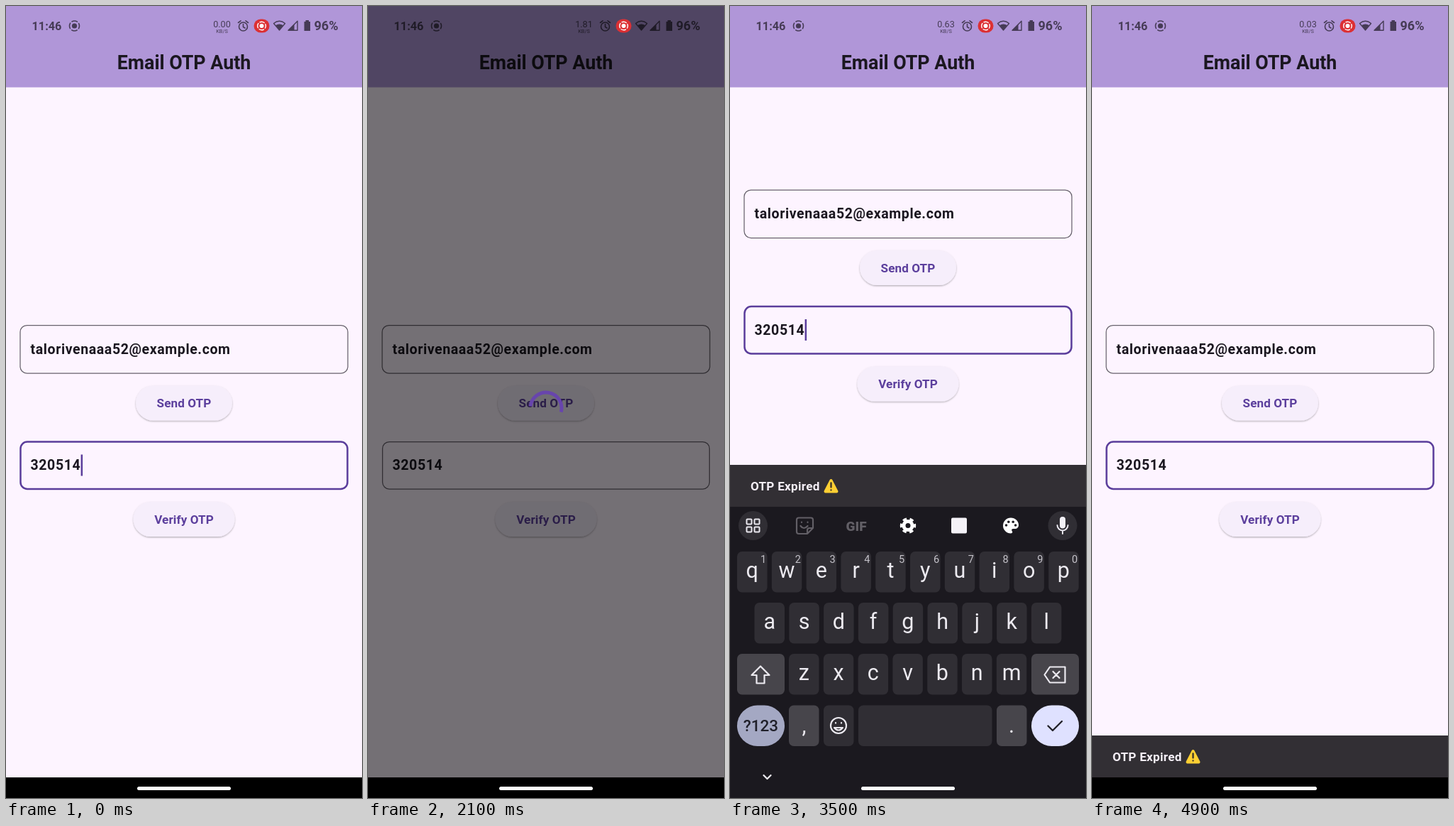
An HTML page that plays this animation: 502 by 1115 pixels, repeating every 5000 ms.

```html
<!DOCTYPE html>
<html lang="en">
<head>
<meta charset="utf-8">
<title>Email OTP Auth</title>
<style>
  html, body { margin: 0; width: 100%; height: 100%; overflow: hidden; background: #000; }
  svg { display: block; width: 502px; height: 1115px; font-family: Roboto, sans-serif; }
  .line { fill: none; stroke: currentColor; stroke-linecap: round; stroke-linejoin: round; }
  .mid { text-anchor: middle; }
  .input { font: 700 19.5px Roboto, sans-serif; letter-spacing: .61px; fill: #1b1720; }
  .button { font: 700 17.1px Roboto, sans-serif; letter-spacing: .12px; fill: #5c3f9d; text-anchor: middle; }
  .field { fill: none; stroke: #68636d; stroke-width: 1.25; }
  .field.focus { stroke: #5a3d9b; stroke-width: 2.5; }
  .letter { font-size: 30.5px; fill: #eceaf0; text-anchor: middle; }
  .hint { font-size: 14.5px; fill: #c5c3ca; text-anchor: middle; }
</style>
</head>
<body>
<svg viewBox="0 0 502 1115">
  <defs>
    <filter id="shadow" x="-10%" y="-20%" width="120%" height="150%">
      <feDropShadow dx="0" dy="1.2" stdDeviation="1" flood-opacity=".3"/>
    </filter>
  </defs>

  <rect width="502" height="1115" fill="#fdf4ff"/>
  <rect width="502" height="114.5" fill="#b096d8"/>
  <text class="mid" x="251" y="89" font-size="26.8" font-weight="700" fill="#1b1720">Email OTP Auth</text>

  <g id="form">
    <rect class="field" x="20" y="449.5" width="462" height="67.5" rx="9.5"/>
    <text class="input" x="34.5" y="489.5">talorivenaaa52@example.com</text>
    <rect x="183" y="534.5" width="136" height="49" rx="24.5" fill="#f6eefb" filter="url(#shadow)"/>
    <text class="button" x="251" y="565">Send OTP</text>
    <rect id="otp" class="field" x="20.5" y="613.5" width="461" height="66.5" rx="9.5"/>
    <text class="input" x="34.5" y="653">320514</text>
    <rect id="caret" x="105.6" y="631.5" width="2.5" height="30" fill="#5a3d9b"/>
    <rect x="179.5" y="698" width="143" height="49" rx="24.5" fill="#f6eefb" filter="url(#shadow)"/>
    <text class="button" x="251" y="728.5">Verify OTP</text>
  </g>

  <g id="snack">
    <rect width="502" height="60" fill="#322f34"/>
    <text x="29" y="35.5" font-size="17.1" font-weight="700" letter-spacing=".3" fill="#f5eff7">OTP Expired</text>
    <path d="M142.5 22L134.5 37.5H150.5Z" fill="#fdcf33" stroke="#fdcf33" stroke-width="4" stroke-linejoin="round"/>
    <path d="M142.5 25.5V31.5M142.5 35.4V35.6" class="line" color="#37312a" stroke-width="2.3"/>
  </g>

  <rect id="shade" width="502" height="1086"/>
  <path id="spin" fill="none" stroke="#6845ad" stroke-width="4.9"/>
  <rect y="1086" width="502" height="29"/>

  <g id="board">
    <rect y="705" width="502" height="410" fill="#1b191f"/>
    <g fill="#302e34"><circle cx="32.5" cy="731.5" r="20.5"/><circle cx="469" cy="731.5" r="20.5"/></g>
    <g class="line" color="#e9e7ee" stroke-width="2">
      <rect x="23.5" y="722.5" width="7" height="7" rx="1"/><rect x="34.5" y="722.5" width="7" height="7" rx="1"/>
      <rect x="23.5" y="733.5" width="7" height="7" rx="1"/><rect x="34.5" y="733.5" width="7" height="7" rx="1"/>
      <path d="M461.5 731a7.5 7.5 0 0 0 15 0M469 739v4"/>
    </g>
    <rect x="465" y="719" width="8" height="16.5" rx="4" fill="#f3f1f7"/>
    <g id="tools">
      <g class="line" color="#625f66" stroke-width="2.2">
        <path d="M97 720.5H114a3 3 0 0 1 3 3V735L109 743H97a3 3 0 0 1-3-3V723.5a3 3 0 0 1 3-3ZM117 735h-5a3 3 0 0 0-3 3v5M99.5 732q4.5 6 10 0M101 726.5v.5M109.5 726.5v.5"/>
      </g>
      <text class="mid" x="178" y="738.5" font-size="19" font-weight="800" fill="#625f66">GIF</text>
      <g fill="none" stroke="#fff">
        <circle cx="251" cy="731.5" r="6" stroke-width="5"/>
        <circle cx="251" cy="731.5" r="9.4" stroke-width="3.6" stroke-dasharray="5.4 4.443" stroke-dashoffset="2.7"/>
      </g>
      <rect x="312" y="720.5" width="22" height="22" rx="2" fill="#f4f2f7"/>
      <path d="M396 720.5a11 11 0 0 0 0 22c2.5 0 2.7-2.1 1.6-3.4-1.2-1.6-.2-3.1 1.7-3.1h2.5c3 0 5.2-2.2 5.2-5.3 0-5.8-5-10.2-11-10.2Z" fill="#fff"/>
      <g fill="#1b191f"><circle cx="389.5" cy="731" r="1.8"/><circle cx="392.8" cy="726.3" r="1.8"/><circle cx="399.2" cy="726.3" r="1.8"/><circle cx="402.6" cy="731" r="1.8"/></g>
    </g>
    <g id="keys"></g>
    <g class="line" color="#eceaf0" stroke-width="2.2">
      <path d="M43 929.5L30.5 942H37.5V953.5H48.5V942H55.5Z"/>
      <path d="M451 930.5H472.5V952.5H451L443.5 941.5ZM455.5 937L464.5 946M464.5 937L455.5 946"/>
      <circle cx="153" cy="1013" r="11"/>
      <path d="M147 1016q6 7 12 0ZM149 1009v.6M157 1009v.6M47.5 1083L52.5 1088L57.5 1083"/>
    </g>
    <path d="M448.5 1013.5L455 1020L468 1007" class="line" color="#23222a" stroke-width="2.3"/>
    <text class="mid" x="43.5" y="1020.5" font-size="22.5" font-weight="500" fill="#20202a">?123</text>
    <text class="letter" x="104.5" y="1023">,</text>
    <text class="letter" x="397" y="1023">.</text>
  </g>

  <g fill="#000" color="#000" opacity=".6">
    <text x="36.5" y="33.5" font-size="16.3" font-weight="600">11:46</text>
    <circle cx="96.5" cy="28" r="3.6"/>
    <circle class="line" cx="96.5" cy="28" r="7" stroke-width="1.6" stroke-dasharray="7.8 3.2" stroke-dashoffset="3.9"/>
    <text id="speed" class="mid" x="304.5" y="29.5" font-size="12.6"></text>
    <text class="mid" x="304.5" y="37.5" font-size="7.4">KB/S</text>
    <path class="line" d="M340.5 29a6 6 0 1 1-12 0a6 6 0 1 1 12 0ZM334.5 25.5V29.5L337 31M327.5 23.5L331 20.8M341.5 23.5L338 20.8" stroke-width="1.6"/>
    <path class="line" d="M377.5 24.5Q385.5 18 393.5 24.5L385.5 34Z" stroke-width="1.4"/>
    <path d="M380 27.3Q385.5 23.5 391 27.3L385.5 34Z"/>
    <path class="line" d="M398 34.2H411V21.2Z" stroke-width="1.4"/>
    <path d="M398 34.2L406.5 25.7V34.2Z"/>
    <path d="M420.5 22H422.5V20H427V22H429V35H420.5Z"/>
    <text x="434.5" y="34" font-size="18" font-weight="600">96%</text>
  </g>
  <rect x="349.5" y="18.5" width="22" height="19" rx="9.5" fill="#dc3034"/>
  <g color="#fff">
    <circle cx="360.5" cy="28" r="3" fill="#fff"/>
    <circle class="line" cx="360.5" cy="28" r="5.8" stroke-width="1.4" stroke-dasharray="6.5 2.61" stroke-dashoffset="3.25"/>
  </g>

  <circle id="touch" r="13" stroke-width="2"/>
  <rect x="185" y="1099" width="132" height="5" rx="2.5" fill="#fff"/>
</svg>

<script>
const LOOP = 5000, STEP = 100, BOARD = 381;
const $ = id => document.getElementById(id);
const [form, otp, caret, snack, shade, spin, board, tools, speed, touch] =
  ['form', 'otp', 'caret', 'snack', 'shade', 'spin', 'board', 'tools', 'speed', 'touch'].map($);

// Keyboard
const PITCH = 48.8, DARK = '#302e34', GREY = '#47454b';
const key = (x, y, w, fill, r = 7) =>
  `<rect x="${x}" y="${y}" width="${w}" height="57.5" rx="${r}" fill="${fill}"/>`;
const row = (chars, left, y, hints) => [...chars].map((c, i) => {
  const x = left + i * PITCH;
  return key(x, y, 42.5, DARK) +
    `<text class="letter" x="${x + 21.2}" y="${y + 36.5}">${c}</text>` +
    (hints ? `<text class="hint" x="${x + 37}" y="${y + 15.5}">${(i + 1) % 10}</text>` : '');
}).join('');
$('keys').innerHTML =
  row('qwertyuiop', 10, 768, true) + row('asdfghjkl', 34.5, 840) + row('zxcvbnm', 83, 912) +
  key(10, 912, 67, GREY) + key(425, 912, 67, GREY) +
  key(10, 984.5, 67, '#a4a8c3', 28.7) + key(83, 984.5, 42.5, GREY) + key(132, 984.5, 42.5, DARK) +
  key(181, 984.5, 188.5, DARK) + key(376, 984.5, 42.5, GREY) + key(425, 984.5, 67, '#dfe1ff', 28.7);

// Each table holds [start, value] pairs; a value holds until the next start.
const at = (table, t) => table.reduce((v, [s, next]) => t >= s ? next : v, table[0][1]);
const SPEED = [[0, '0.00'], [1900, '1.81'], [3400, '0.63'], [4900, '0.03']];
const SHADE = [[0, 0], [1300, .3], [1400, .54], [2200, .3], [2300, 0]];
const SPIN = [[0, 0], [1300, .5], [1400, 1], [2200, .5], [2300, 0]];
const SNACK = [[0, 0], [2200, .35], [2300, 1]];
const RISE = [[0, 0], [2300, .693], [2400, .94], [2500, 1], [3800, .388], [3900, .06], [4000, 0]];
const CARET = [[0, 1], [500, 0], [1000, 1], [1300, 0], [2200, 1], [2700, 0], [3200, 1], [3700, 0], [4200, 1], [4700, 0]];
const TOUCH = [[0, null], [1200, [296, 726, 'rgba(225,220,230,.7)', 'rgba(150,140,165,.3)']], [1400, null],
  [3700, [81, 1082, 'rgba(190,190,195,.5)', 'rgba(120,120,125,.4)']], [3900, null]];

// cubic-bezier(.4, 0, .2, 1)
function ease(x) {
  if (x <= 0) return 0;
  if (x >= 1) return 1;
  let lo = 0, hi = 1, u = .5;
  for (let i = 0; i < 20; i++) {
    u = (lo + hi) / 2;
    const bx = 1.2 * u * (1 - u) ** 2 + .6 * u * u * (1 - u) + u ** 3;
    bx < x ? lo = u : hi = u;
  }
  return 3 * u * u * (1 - u) + u ** 3;
}

function arc(ms) {
  const p = ms / 1333 % 1, tail = ease(p * 2 - 1), turn = Math.PI * 2;
  const a = -turn / 4 + tail * .75 * turn + ms / 2222 * turn + p * turn / 4;
  const sweep = Math.max((ease(p * 2) - tail) * .75 * turn, .12);
  const point = q => `${251 + 22 * Math.cos(q)} ${566 + 22 * Math.sin(q)}`;
  return `M${point(a)}A22 22 0 ${sweep > Math.PI ? 1 : 0} 1 ${point(a + sweep)}`;
}

const move = (el, y) => el.setAttribute('transform', `translate(0 ${y})`);
const show = (el, on) => el.setAttribute('visibility', on ? 'inherit' : 'hidden');

function draw(t) {
  const h = BOARD * at(RISE, t), enter = at(SNACK, t), spinning = at(SPIN, t), dot = at(TOUCH, t);
  move(form, -h / 2);
  move(board, BOARD - h);
  move(snack, 1086 - h - 59 * enter);
  show(board, h > 0);
  show(tools, t < 3800);
  show(snack, enter > 0);
  show(caret, at(CARET, t));
  otp.classList.toggle('focus', t < 1500 || t >= 2200);
  shade.setAttribute('opacity', at(SHADE, t));
  spin.setAttribute('opacity', spinning);
  if (spinning) spin.setAttribute('d', arc(t - 1250));
  speed.textContent = at(SPEED, t);
  show(touch, dot);
  if (dot) ['cx', 'cy', 'fill', 'stroke'].forEach((name, i) => touch.setAttribute(name, dot[i]));
}

const start = performance.now();
function tick() {
  const t = (performance.now() - start) % LOOP;
  draw(Math.floor(t / STEP) * STEP);
  requestAnimationFrame(tick);
}
tick();
</script>
</body>
</html>
```
